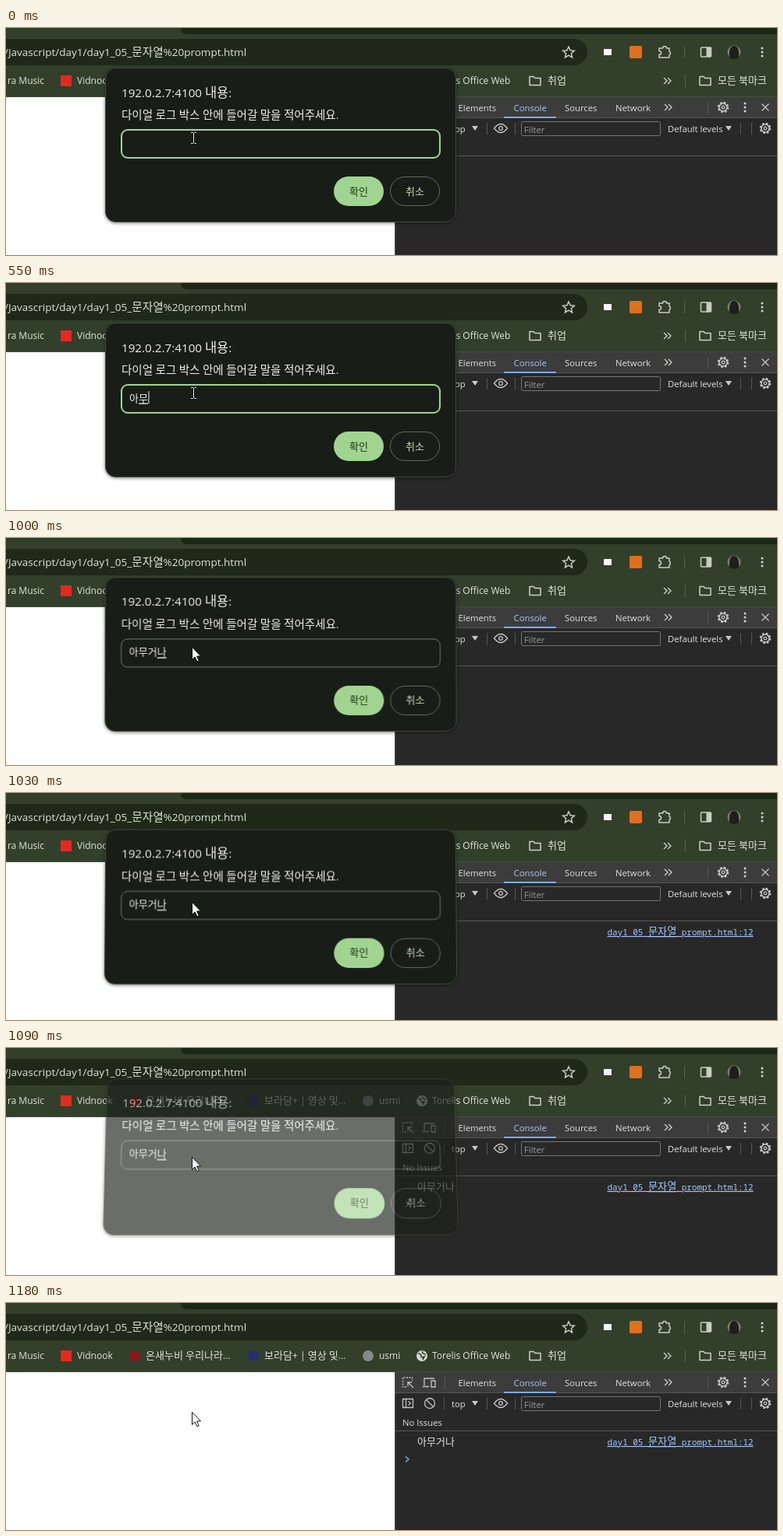
An HTML page for the animation above (1.97 s loop, 988 px wide and 292 px high).

```html
<!DOCTYPE html>
<html lang="ko">
<head>
<meta charset="utf-8">
<title>Prompt dialog</title>
<style>
  html, body { margin: 0; width: 100%; height: 100%; overflow: hidden; background: #fff; }
  svg { position: absolute; left: 0; top: 0; width: 988px; height: 292px; }
  text { font-family: "Open Sans", "Noto Sans CJK KR", "Noto Sans CJK", sans-serif; font-size: 12px; white-space: pre; }
  .ko { font-size: 1.085em; font-family: "Noto Sans CJK KR", "Noto Sans CJK", sans-serif; }
  .bar text { fill: #dfe5d8; }
  .tools text { fill: #e0e0e0; font-size: 11.3px; }
  .tools .log { font-size: 12px; font-weight: 300; }
  .tools .link { font: 10.95px "Noto Sans Mono", "DejaVu Sans Mono", monospace; fill: #a8c7fa; text-decoration: underline; }
  .link .ko { font-size: 1.2em; }
  .line { fill: none; stroke: #c6cec0; stroke-width: 1.5; }
  .tools .line { stroke: #c4c4c4; stroke-width: 1.3; }
  .rule { stroke: #565656; }
  #dialog { left: 107px; top: 31px; width: 490px; height: 240px; transform-origin: 245px 119.5px; }
  #dialog text { fill: #eef1ea; }
</style>
</head>
<body>
<svg viewBox="0 0 988 292">
  <defs>
    <g id="folder"><path d="M1 2.5h5l2 2h7v9H1z" fill="none" stroke="#cbd3c5" stroke-width="1.5" stroke-linejoin="round"/></g>
    <g id="gear" fill="none" stroke="#c8c8c8">
      <circle r="5" stroke-width="1.5"/><circle r="6.3" stroke-width="2" stroke-dasharray="2.6 2.35"/><circle r="1.8" stroke-width="1.3"/>
    </g>
    <path id="more" d="M0 0l4 4-4 4M5 0l4 4-4 4" fill="none" stroke="#c8ccc5" stroke-width="1.4"/>
    <g id="dots" fill="#d3d6d0"><circle cy="-5" r="1.5"/><circle r="1.5"/><circle cy="5" r="1.5"/></g>
  </defs>

  <g class="bar">
    <rect width="988" height="89" fill="#323f2b"/>
    <path d="M0 88.500h988" stroke="#434f3b"/>
    <path d="M224 0h764v8H232q-8 0-8-8z" fill="#1b2717"/>
    <rect x="-40" y="14" width="785" height="34" rx="17" fill="#1e291a"/>
    <text x="-2" y="35.500" style="font-size:13.5px">/Javascript/day1/day1_05_문자열%20prompt.html</text>
    <path class="line" d="M721 24l2.1 4.8 5.2.5-3.9 3.5 1.1 5.1-4.5-2.7-4.5 2.7 1.1-5.1-3.9-3.5 5.2-.5z"/>
    <rect x="766" y="27" width="10" height="8" fill="#f4f6f2"/>
    <rect x="799" y="23" width="16" height="16" rx="2" fill="#e0701c"/>
    <path class="line" d="M837 26h4.500a2.500 2.500 0 0 1 5 0h3.500v4a2.500 2.500 0 0 1 0 4.500v3.500h-13v-3.500a2.500 2.500 0 0 0 0-5z"/>
    <path d="M869.500 23v16M870.500 60v16" stroke="#566350"/>
    <rect class="line" x="890.500" y="25" width="13" height="12" rx="1"/>
    <rect x="897.500" y="25" width="6" height="12" fill="#c6cec0"/>
    <circle cx="933" cy="31" r="8.500" fill="#79806c"/>
    <path d="M927 38q-1-15 6-15t6 15q-3 2-6 2t-6-2z" fill="#1d1f1b"/>
    <use href="#dots" x="969" y="31"/>

    <text x="49" y="72" text-anchor="end">ra Music</text>
    <rect x="70" y="61" width="14" height="14" fill="#e22b20"/>
    <text x="91" y="72">Vidnook</text>
    <rect x="159" y="62" width="12" height="12" fill="#8e1519"/>
    <text x="179" y="72">온새누비 우리나라...</text>
    <rect x="311" y="62" width="12" height="12" fill="#292c75"/>
    <text x="331" y="72">보라담+ | 영상 및...</text>
    <circle cx="464" cy="68" r="7" fill="#85898a"/>
    <text x="478" y="72">usmi</text>
    <circle cx="533" cy="68" r="7" fill="#d2d8cd"/>
    <path d="M528 65q4 0 4 3t4 1l-2 4M534 62q-2 3 4 4" fill="none" stroke="#323f2b" stroke-width="1.700"/>
    <text x="546" y="72">Torelis Office Web</text>
    <use href="#folder" x="670" y="60"/>
    <text x="694" y="72">취업</text>
    <use href="#more" x="843" y="64"/>
    <use href="#folder" x="888" y="60"/>
    <text x="912" y="72">모든 북마크</text>
  </g>

  <rect y="89" width="498" height="203" fill="#fff"/>

  <g class="tools">
    <rect x="498" y="89" width="490" height="203" fill="#282828"/>
    <rect x="499" y="89" width="489" height="26" fill="#3c3c3c"/>
    <path class="rule" d="M498.500 89v203M499 115.500h489M499 164.500h489M562.500 95v15M899.500 95v15M561.500 122v15M616.500 122v15M652.500 122v15M941.500 122v15M955.500 122v15"/>
    <path d="M638 115h67" stroke="#7cacf8" stroke-width="2"/>
    <path class="line" stroke-dasharray="2 1.500" d="M513 108h-4.500v-12h12v4"/>
    <path class="line" d="M522 109l-7-7m0 5v-5h5M536 106v-9h13M534 107.500h8M545 100h5v8h-5z"/>
    <text x="579.500" y="107">Elements</text>
    <text x="650.500" y="107" style="fill:#a8c7fa">Console</text>
    <text x="716" y="107">Sources</text>
    <text x="781" y="107">Network</text>
    <use href="#more" x="844" y="98"/>
    <use href="#gear" x="919" y="102"/>
    <use href="#dots" x="947" y="102"/>
    <path class="line" d="M968.500 97.500l9 9m0-9l-9 9"/>

    <path class="line" d="M508.500 123.500h13v11h-13zM512.500 123.500v11M515.500 126.500l3 2.500-3 2.500"/>
    <circle class="line" cx="543" cy="129" r="6.500"/>
    <path class="line" d="M538.500 124.500l9 9"/>
    <text x="571" y="133.500">top</text>
    <path d="M597 126h8l-4 6zM922 126h8l-4 6z" fill="#c8c8c8"/>
    <path class="line" d="M625.500 129q8.500-11 17 0-8.500 11-17 0z"/>
    <circle class="line" cx="634" cy="129" r="2.300"/>
    <rect x="660.500" y="120.500" width="178" height="18" rx="2" fill="#282828" stroke="#757575"/>
    <text x="664" y="135" style="fill:#9a9a9a">Filter</text>
    <text x="848" y="133.500">Default levels</text>
    <use href="#gear" x="973" y="129"/>
    <text x="508" y="158">No Issues</text>
    <g id="output">
      <text class="log" x="527" y="183">아무거나</text>
      <text class="link" x="770.500" y="183">day1_05_문자열_prompt.html:12</text>
    </g>
    <path d="M512 197.500l4 3.500-4 3.500" fill="none" stroke="#7fb6d0" stroke-width="1.400"/>
  </g>
</svg>

<svg id="dialog" viewBox="107 31 490 240">
  <rect x="127.500" y="51.500" width="449" height="198" rx="13" fill="#191d17" stroke="#434a3f" style="filter:drop-shadow(0 1px 2px #0008)"/>
  <text x="148" y="88.500" style="font-size:15.2px">192.0.2.7:4100 내용:</text>
  <text x="148" y="117" style="font-size:13.4px">다이얼 로그 박스 안에 들어갈 말을 적어주세요.</text>
  <rect id="field" x="148" y="131" width="408" height="36" rx="8" fill="none"/>
  <text id="typed" x="158" y="152.500"></text>
  <rect id="composing" y="154.500" width="12" height="1.300" fill="#eef1ea"/>
  <rect id="caret" y="139" width="1" height="16" fill="#eef1ea"/>
  <rect x="420" y="191" width="64" height="38" rx="19" fill="#a1d490"/>
  <text x="452" y="214.500" text-anchor="middle" style="fill:#1d3714">확인</text>
  <rect x="492.500" y="191.500" width="63" height="37" rx="18.500" fill="none" stroke="#62695d"/>
  <text x="524" y="214.500" text-anchor="middle" style="fill:#c3d9b9">취소</text>
</svg>

<svg viewBox="0 0 988 292">
  <g id="beam" fill="none">
    <path d="M237 134.500h2.500l1 1 1-1h2.500M240.500 135v13M237 148.500h2.500l1-1 1 1h2.500" stroke="#0008" stroke-width="3"/>
    <path d="M237 134.500h2.500l1 1 1-1h2.500M240.500 135v13M237 148.500h2.500l1-1 1 1h2.500" stroke="#f2f2f2"/>
  </g>
  <path id="arrow" d="M238.500 140.500v16l3.700-3.500 2.600 5.800 2.400-1-2.600-5.800h4.900z" fill="#fff" stroke="#111"/>
</svg>

<script>
  const LOOP = 1970, CLOSE = 1000, LOGGED = 1030;
  const SYLLABLE = 11.98;
  const typing = [
    [0, ""], [160, "ㅇ"], [260, "아"], [360, "암"], [460, "아무"],
    [560, "아묵"], [650, "아무거"], [750, "아무건"], [780, "아무거나"]
  ];
  // time, lift, tilt in degrees, vertical scale, opacity
  const closing = [
    [1000, -1, 0.5, 1, 1], [1030, -4.5, 2, 1.005, 1], [1060, -8, 4.2, 1.012, 0.93],
    [1090, -11.5, 6.3, 1.02, 0.65], [1120, -15, 7.5, 1.028, 0.29],
    [1150, -18.5, 8.5, 1.035, 0.05], [1180, -18.5, 8.5, 1.035, 0]
  ];

  const byId = id => document.getElementById(id);
  const [dialog, field, typed, composing, caret, output, beam, arrow] =
    ["dialog", "field", "typed", "composing", "caret", "output", "beam", "arrow"].map(byId);
  const at = (steps, t) => steps.findLast(step => step[0] <= t);
  const show = (el, on) => { el.style.display = on ? "" : "none"; };
  const hangul = s => s.replace(/[\u3131-\u318e\uac00-\ud7a3]+/g, run => `<tspan class="ko">${run}</tspan>`);

  document.querySelectorAll("text").forEach(el => { el.innerHTML = hangul(el.textContent); });

  let lastText = null;
  function setTyped(value) {
    if (value === lastText) return;
    lastText = value;
    typed.innerHTML = hangul(value);
    composing.setAttribute("x", 158 + (value.length - 1) * SYLLABLE);
    caret.setAttribute("x", 158.5 + value.length * SYLLABLE);
    show(composing, value);
  }

  function draw(t) {
    const closed = t >= CLOSE;
    setTyped(at(typing, t)[1]);
    show(caret, !closed && t >= 160);
    field.setAttribute("stroke", closed ? "#6d7568" : "#a6d396");
    field.setAttribute("stroke-width", closed ? 1 : 2);
    show(beam, !closed);
    show(arrow, closed);
    show(output, t >= LOGGED);
    const [, lift, tilt, stretch, opacity] = closed ? at(closing, t) : [0, 0, 0, 1, 1];
    dialog.style.opacity = opacity;
    dialog.style.transform = closed
      ? `translateY(${lift}px) perspective(1000px) rotateX(${tilt}deg) scale(1.002, ${stretch})`
      : "none";
  }

  const start = performance.now();
  function tick() {
    draw((performance.now() - start) % LOOP);
    requestAnimationFrame(tick);
  }
  tick();
</script>
</body>
</html>
```
